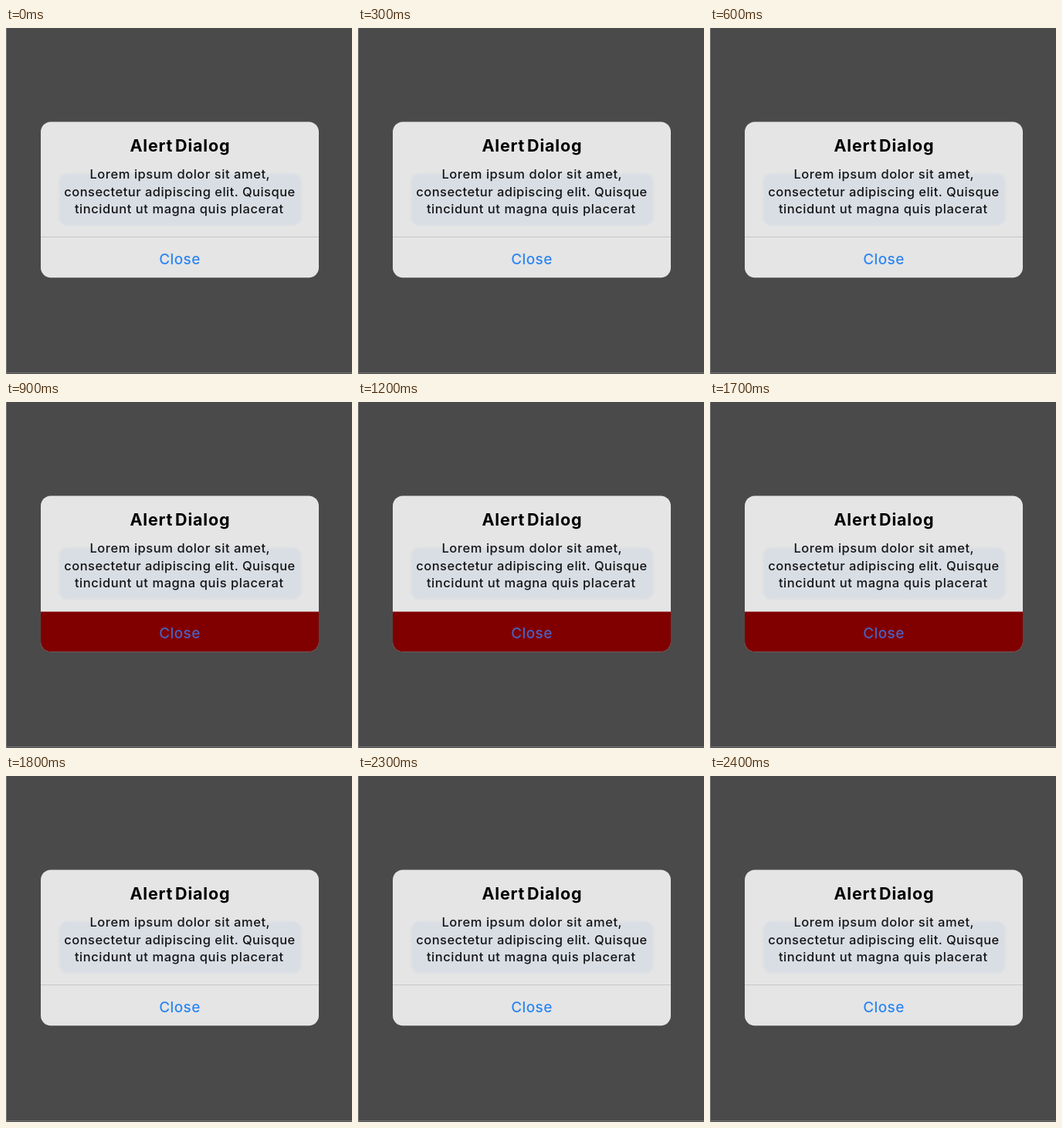
Recreate the animation shown at these times as an HTML page. Size 448x448 px, loop 2.9 s.

```html
<!DOCTYPE html>
<html lang="en">
<head>
<meta charset="utf-8">
<title>Alert dialog</title>
<style>
  html, body { margin: 0; width: 100%; height: 100%; overflow: hidden; background: #4a4a4a; }
  svg { display: block; width: 100vw; height: 100vh; }
  text { font-family: Inter, Roboto, sans-serif; font-weight: 500; text-anchor: middle; }
  .title { font-size: 21.5px; font-weight: 700; letter-spacing: .8px; word-spacing: -3px; }
  .body { font-size: 16.5px; letter-spacing: .55px; fill: #151517; }
  .tight { letter-spacing: .47px; }
  .close { font-size: 19px; letter-spacing: .4px; fill: #2f87f0; }
  .ghost { filter: blur(.8px); }
</style>
</head>
<body>
<svg viewBox="0 0 448 448">
  <clipPath id="card"><rect x="45" y="121.4" width="360" height="201.8" rx="13"/></clipPath>
  <rect width="448" height="448" fill="#4a4a4a"/>
  <path d="M.5 0V448M0 446.5H448" stroke="#777" fill="none"/>
  <g clip-path="url(#card)">
    <rect x="45" y="121" width="360" height="203" fill="#e5e5e5"/>
    <rect class="ghost" x="68.5" y="188.5" width="314" height="67" rx="11" fill="#d9dee4"/>
    <rect id="rule" x="45" y="270" width="360" height="1" fill="#c6c6c6"/>
    <rect id="press" x="45" y="271.5" width="360" height="53" fill="#800000"/>
  </g>
  <text class="title" x="225.4" y="160.3">Alert Dialog</text>
  <g class="body">
    <text x="225.3" y="195">Lorem ipsum dolor sit amet,</text>
    <text class="tight" x="225" y="218">consectetur adipiscing elit. Quisque</text>
    <text x="224.3" y="240">tincidunt ut magna quis placerat</text>
  </g>
  <text class="close" id="close" x="225" y="306">Close</text>
</svg>
<script>
  const LOOP = 2900, DOWN = 900, UP = 1800;
  const [rule, press, label] = ['rule', 'press', 'close'].map(id => document.getElementById(id));
  const show = (el, on) => el.setAttribute('visibility', on ? 'visible' : 'hidden');

  function draw() {
    const t = performance.now() % LOOP;
    const held = t >= DOWN && t < UP;
    show(press, held);
    show(rule, !held);
    label.style.fill = held ? '#4b5fc0' : '#2f87f0';
    requestAnimationFrame(draw);
  }
  draw();
</script>
</body>
</html>
```
